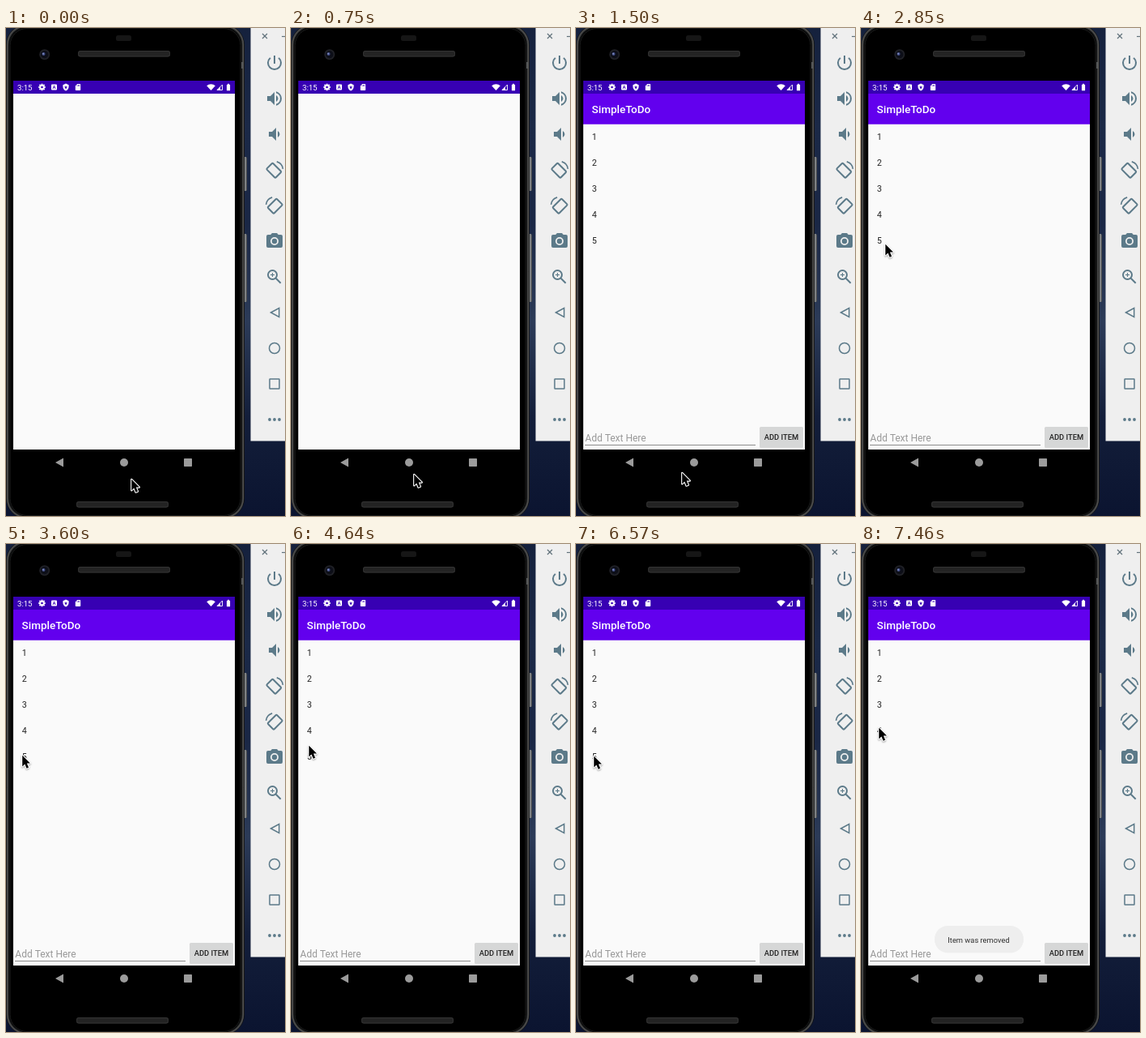
These frames come from a looping animation (345x602 px, 8 s). An HTML page with a canvas:

```html
<!DOCTYPE html>
<html lang="en">
<head>
<meta charset="utf-8">
<title>SimpleToDo demo</title>
<style>
html, body { margin: 0; width: 100%; height: 100%; overflow: hidden; background: #0c1630; }
canvas { display: block; width: 345px; height: 602px; }
</style>
</head>
<body>
<canvas id="stage"></canvas>
<script>
const W = 345, H = 602, LOOP = 8000;
const canvas = document.getElementById('stage');
const ctx = canvas.getContext('2d');
const dpr = window.devicePixelRatio || 1;
canvas.width = W * dpr;
canvas.height = H * dpr;

// Pointer stops: time, x, y. Each position is held until the next one.
const STOPS = [
  [0, 155, 557], [150, 154, 555], [300, 153, 552], [450, 152, 550], [750, 152, 551],
  [1350, 148, 551], [1500, 131, 549], [1650, 127, 548],
  [1950, 113, 484], [2100, 84, 378], [2250, 67.5, 311],
  [2550, 52, 288], [2700, 38, 273], [2850, 30, 267], [3000, 22, 262], [3150, 19, 261],
  [3600, 20, 261], [3740, 20, 262],
  [4640, 22, 249], [4790, 24, 234], [4940, 26, 223], [5090, 26, 222],
  [5230, 24, 234], [5380, 21, 252], [5530, 19, 260],
  [5830, 20, 261], [5970, 21, 261],
  [6570, 22, 262], [7020, 22, 259], [7160, 23, 244], [7310, 22, 230], [7460, 22, 227]
];
const OPEN = 1350, REMOVE = 6870;
const SLATE = '#5c7a89';

const ICONS = {
  power: 'M13 3h-2v10h2zM17.83 5.17l-1.42 1.42A7 7 0 1 1 7.58 6.58L6.17 5.17A9 9 0 1 0 17.83 5.17z',
  low: 'M18.5 12a4.5 4.5 0 0 0-2.5-4.03v8.05a4.5 4.5 0 0 0 2.5-4.02zM5 9v6h4l5 5V4L9 9z',
  loud: 'M3 9v6h4l5 5V4L7 9zM16.5 12a4.5 4.5 0 0 0-2.5-4.03v8.05a4.5 4.5 0 0 0 2.5-4.02zM14 3.23v2.06a7 7 0 0 1 0 13.42v2.06a9 9 0 0 0 0-17.54z',
  camera: 'M9 2L7.17 4H4a2 2 0 0 0-2 2v12a2 2 0 0 0 2 2h16a2 2 0 0 0 2-2V6a2 2 0 0 0-2-2h-3.17L15 2zM12 17a5 5 0 1 1 0-10 5 5 0 0 1 0 10zM12 15.2a3.2 3.2 0 1 0 0-6.4 3.2 3.2 0 0 0 0 6.4z',
  shield: 'M12 1L3 5v6c0 5.5 3.8 10.7 9 12 5.2-1.3 9-6.5 9-12V5zM12 7l1.5 3.5 3.5.5-2.5 2.5.5 3.5-3-2-3 2 .5-3.5L7 11l3.5-.5z',
  card: 'M18 2h-8L4 8v12a2 2 0 0 0 2 2h12a2 2 0 0 0 2-2V4a2 2 0 0 0-2-2zM8.5 9V5.5h2V9zM12 9V5h2v4zM15.5 9V5h2v4z',
  battery: 'M15.7 4H14V2h-4v2H8.3C7.6 4 7 4.6 7 5.3v15.4c0 .7.6 1.3 1.3 1.3h7.4c.7 0 1.3-.6 1.3-1.3V5.3c0-.7-.6-1.3-1.3-1.3z',
  pointer: 'M.5 .2V13.8L3.6 10.9L5.8 16.1L8.3 15.1L6.1 10H10.2z'
};
const paths = {};
for (const name in ICONS) paths[name] = new Path2D(ICONS[name]);

function rect(x, y, w, h, fill, r = 0) {
  ctx.fillStyle = fill;
  ctx.beginPath();
  ctx.roundRect(x, y, w, h, r);
  ctx.fill();
}

function outline(x, y, w, h, r, color, width) {
  ctx.strokeStyle = color;
  ctx.lineWidth = width;
  ctx.beginPath();
  ctx.roundRect(x, y, w, h, r);
  ctx.stroke();
}

function disc(x, y, r, fill) {
  ctx.fillStyle = fill;
  ctx.beginPath();
  ctx.arc(x, y, r, 0, 7);
  ctx.fill();
}

function poly(points, fill) {
  ctx.beginPath();
  for (const [x, y] of points) ctx.lineTo(x, y);
  ctx.closePath();
  if (fill) { ctx.fillStyle = fill; ctx.fill(); } else ctx.stroke();
}

function line(x1, y1, x2, y2) {
  ctx.beginPath();
  ctx.moveTo(x1, y1);
  ctx.lineTo(x2, y2);
  ctx.stroke();
}

function text(str, x, y, size, fill, weight = 400) {
  ctx.font = `${weight} ${size}px Roboto, sans-serif`;
  ctx.fillStyle = fill;
  ctx.fillText(str, x, y);
}

// Fills a 24-unit icon centred at x, y.
function icon(name, x, y, scale, fill) {
  ctx.save();
  ctx.translate(x, y);
  ctx.scale(scale, scale);
  ctx.translate(-12, -12);
  ctx.fillStyle = fill;
  ctx.fill(paths[name], 'evenodd');
  ctx.restore();
}

function gradient(x1, y1, x2, y2, ...colors) {
  const g = ctx.createLinearGradient(x1, y1, x2, y2);
  colors.forEach((c, i) => g.addColorStop(i / (colors.length - 1), c));
  return g;
}

function drawPhone() {
  rect(0, 0, W, H, gradient(0, 0, 0, H, '#15213d', '#1b2947', '#1a2745', '#2c3b58', '#131e3a', '#0b1430'));

  for (const [y, h] of [[159, 42], [254, 84]]) {
    rect(293, y, 5, h, gradient(293, 0, 298, 0, '#222', '#8c8f92', '#4a4c4e'), 1.5);
  }
  rect(0, -4, 295, 609, '#0c0d0d', 25);
  outline(2, -2.5, 291, 606, 23, '#3a3b3b', 2.5);
  outline(1.5, -3, 292, 607, 24, '#585959', 0.8);
  rect(4.5, 0, 286, 602, '#000', 21);
  outline(5, 0.5, 285, 601, 21, '#1c1d1d', 1);
  rect(291, 42, 3, 8, '#555657');

  rect(136, 9, 19, 7, '#161616', 2.5);
  for (const [x, y] of [[89, 28], [87, 584]]) {
    rect(x, y, 114, 7.5, '#232323', 2.5);
    outline(x + 0.5, y + 0.5, 113, 6.5, 2.5, '#333', 1);
  }
  disc(47.7, 32.7, 6.5, '#202126');
  disc(47.7, 32.7, 4.7, '#0d0f18');
  disc(46.5, 32, 2, '#424e88');
  disc(46, 31.7, 0.9, '#8c9ac4');

  poly([[61, 536], [71, 530.5], [71, 541.5]], '#9b9b9b');
  disc(146, 536, 5, '#9b9b9b');
  rect(220, 531, 10, 10, '#9b9b9b', 0.7);
}

function drawGear(x, y) {
  for (let i = 0; i < 4; i++) {
    ctx.save();
    ctx.translate(x, y);
    ctx.rotate(i * Math.PI / 4);
    rect(-0.9, -4.3, 1.8, 8.6, '#fff');
    ctx.restore();
  }
  disc(x, y, 3.2, '#fff');
  disc(x, y, 1.3, '#3700b3');
}

function drawStatusBar() {
  rect(9, 65, 274, 16, '#3700b3');
  text('3:15', 14, 77, 9.6, '#fff');
  drawGear(44.5, 73);
  rect(56, 69.5, 7, 7, '#fff', 1);
  text('A', 57.5, 75.3, 6, '#3700b3', 700);
  icon('shield', 74, 73, 0.4, '#fff');
  icon('card', 89, 73, 0.4, '#fff');
  ctx.fillStyle = '#fff';
  ctx.beginPath();
  ctx.moveTo(253.5, 77);
  ctx.arc(253.5, 77, 7.8, -Math.PI * 0.74, -Math.PI * 0.26);
  ctx.fill();
  ctx.strokeStyle = '#fff';
  ctx.lineWidth = 0.9;
  poly([[261, 76.5], [267.5, 76.5], [267.5, 70]]);
  poly([[261, 76.5], [265, 76.5], [265, 72.5]], '#fff');
  icon('battery', 275, 73, 0.42, '#fff');
}

function drawApp(t) {
  rect(9, 81, 274, 439, '#fafafa');
  if (t < OPEN) return;
  const fading = t < OPEN + 150;
  rect(9, 81, 274, 37.7, fading ? '#8428f5' : '#6200ee');
  text('SimpleToDo', 19.6, 105, 13.5, '#fff', 500);

  ctx.globalAlpha = fading ? 0.8 : 1;
  const count = t < REMOVE + 150 ? 5 : 4;
  for (let i = 0; i < count; i++) text(String(i + 1), 19.7, 138.3 + i * 32, 10.67, '#222');

  text('Add Text Here', 11.3, 509.5, 12, '#999');
  rect(11, 514, 211, 1, '#8b8b8b');
  rect(227, 493, 54, 25, 'rgba(0,0,0,.12)', 1.5);
  rect(227, 492, 54, 25, '#d6d7d7', 1.5);
  text('ADD ITEM', 232.8, 507.6, 9.33, '#222', 500);
  ctx.globalAlpha = 1;
}

function drawToast(t) {
  const step = Math.floor((t - REMOVE) / 145);
  if (step < 1) return;
  ctx.save();
  ctx.globalAlpha = Math.min(1, step / 3);
  rect(91, 471.5, 110, 33, 'rgba(0,0,0,.04)', 16.5);
  rect(91, 471, 110, 33, '#eeeeee', 16.5);
  text('Item was removed', 107.3, 491.5, 9.33, '#303030');
  ctx.restore();
}

// A tilted device with a turning arc beside its upper corner.
function drawRotate(y, flip) {
  ctx.save();
  ctx.translate(332, y);
  ctx.scale(flip, 1);
  ctx.lineWidth = 1.6;
  ctx.beginPath();
  ctx.arc(0, 0, 10.5, -1.3, -0.1);
  ctx.stroke();
  ctx.translate(-0.7, 0.7);
  ctx.rotate(Math.PI / 4);
  outline(-7.8, -5.4, 15.6, 10.8, 1.2, SLATE, 2);
  ctx.restore();
}

function drawPanel() {
  rect(302.5, 0, 42.5, 509.5, '#efefef');
  ctx.strokeStyle = '#62737c';
  ctx.lineWidth = 1.2;
  line(317, 7, 323, 13);
  line(323, 7, 317, 13);
  line(341, 10.5, 345, 10.5);

  icon('power', 332, 43, 1, SLATE);
  icon('loud', 332, 87, 1, SLATE);
  icon('low', 332, 131, 1, SLATE);
  ctx.strokeStyle = SLATE;
  drawRotate(175, 1);
  drawRotate(219, -1);
  icon('camera', 332, 263, 1, SLATE);

  ctx.lineWidth = 2;
  ctx.beginPath();
  ctx.arc(329.5, 304.5, 5.5, 0, 7);
  ctx.stroke();
  line(333.7, 308.7, 339.7, 314.7);
  ctx.lineWidth = 1.1;
  line(327, 304.5, 332, 304.5);
  line(329.5, 302, 329.5, 307);

  ctx.lineWidth = 1.5;
  poly([[327.5, 351], [337.7, 345.5], [337.7, 356.5]]);
  ctx.beginPath();
  ctx.arc(332, 395, 6.5, 0, 7);
  ctx.stroke();
  outline(326, 433, 12, 12, 0.5, SLATE, 1.5);
  for (const x of [326, 332, 338]) disc(x, 483, 1.9, SLATE);
}

function drawPointer(t) {
  const [, x, y] = STOPS.filter(s => s[0] <= t).pop();
  ctx.save();
  ctx.translate(x - 0.3, y - 0.4);
  ctx.shadowColor = 'rgba(0,0,0,.35)';
  ctx.shadowBlur = 2 * dpr;
  ctx.shadowOffsetY = dpr;
  ctx.lineJoin = 'round';
  ctx.strokeStyle = '#fff';
  ctx.lineWidth = 2.2;
  ctx.stroke(paths.pointer);
  ctx.shadowColor = 'transparent';
  ctx.fillStyle = '#000';
  ctx.fill(paths.pointer);
  ctx.restore();
}

let start;
function frame(now) {
  start ??= now;
  const t = Math.max(0, now - start) % LOOP;
  ctx.setTransform(dpr, 0, 0, dpr, 0, 0);
  drawPhone();
  drawStatusBar();
  drawApp(t);
  drawToast(t);
  drawPanel();
  drawPointer(t);
  requestAnimationFrame(frame);
}
requestAnimationFrame(frame);
</script>
</body>
</html>
```
